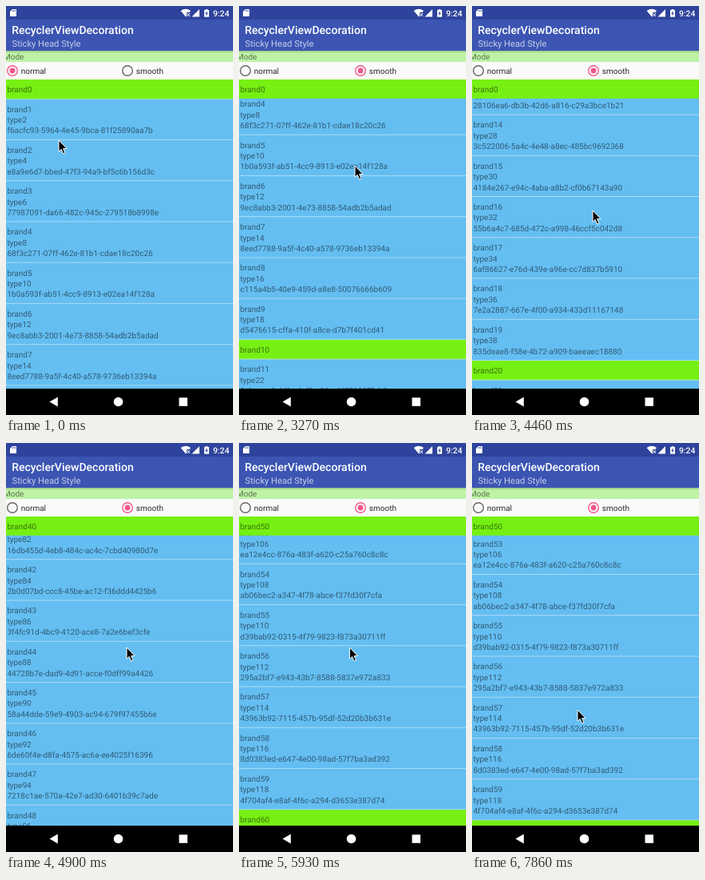
These frames come from a looping animation (284 px wide and 512 px high, 8 s). An HTML page with a canvas:

```html
<!DOCTYPE html>
<html lang="en">
<head>
<meta charset="utf-8">
<title>Sticky head list</title>
<style>
  html, body { margin: 0; width: 100%; height: 100%; overflow: hidden; background: #000; }
  canvas { display: block; width: 284px; height: 512px; }
</style>
</head>
<body>
<canvas id="stage"></canvas>
<script>
const W = 284, H = 512, LOOP = 8000, TICK = 148.3, LAST_TICK = 53;
const LIST_TOP = 92, LIST_BOTTOM = 479;
const HEAD_H = 24.6, ITEM_H = 51.25, GROUP_H = HEAD_H + 9 * ITEM_H;
const FONT = 'Roboto, "Noto Sans", sans-serif';
const GREEN = '#76f013', BLUE = '#64bef2', PINK = '#f2588a', GRAY = '#666';
const STATUS = '#2e439c', BAR = '#3c55b3', LINE = '#b4dcf4';
const SOFT = 'rgba(0,0,0,.52)';

const canvas = document.getElementById('stage');
const ctx = canvas.getContext('2d');
const ratio = window.devicePixelRatio || 1;
canvas.width = W * ratio;
canvas.height = H * ratio;
ctx.scale(ratio, ratio);
ctx.textRendering = 'geometricPrecision';

// Row labels of the resting screens; rows that only pass by get seeded ids.
const restingIds = {
  1: `f6acfc93-5964-4e45-9bca-81f25890aa7b e8a9e6d7-bbed-47f3-94a9-bf5c6b156d3c
      77987091-da66-482c-945c-279518b8998e 68f3c271-07ff-462e-81b1-cdae18c20c26
      1b0a593f-ab51-4cc9-8913-e02ea14f128a 9ec8abb3-2001-4e73-8858-54adb2b5adad
      8eed7788-9a5f-4c40-a578-9736eb13394a`,
  53: `ea12e4cc-876a-483f-a620-c25a760c8c8c ab06bec2-a347-4f78-abce-f37fd30f7cfa
      d39bab92-0315-4f79-9823-f873a30711ff 295a2bf7-e943-43b7-8588-5837e972a833
      43963b92-7115-457b-95df-52d20b3b631e 8d0383ed-e647-4e00-98ad-57f7ba3ad392
      4f704af4-e8af-4f6c-a294-d3653e387d74`
};
const ids = {};
for (const [first, run] of Object.entries(restingIds))
  run.split(/\s+/).forEach((id, i) => { ids[+first + i] = id; });

function idFor(n) {
  if (ids[n]) return ids[n];
  let seed = n * 7919 + 17;
  const hex = () => {
    seed = (Math.imul(seed, 1664525) + 1013904223) >>> 0;
    return (seed >>> 28).toString(16);
  };
  return ids[n] = 'xxxxxxxx-xxxx-4xxx-axxx-xxxxxxxxxxxx'.replace(/x/g, hex);
}

// Pointer moves in ticks; it rests between them.
const home = { x: 66, y: 168 };
const moves = [
  { from: 1, to: 4, x: 125, y: 355 },
  { from: 4, to: 6, x: 171, y: 190 },
  { from: 6, to: 8, x: 153, y: 74 },
  { from: 14, to: 18, x: 146, y: 371 },
  { from: 19, to: 22, x: 145, y: 200 },
  { from: 22, to: 27, x: 151, y: 467 },
  { from: 28, to: 30, x: 151, y: 256 },
  { from: 36, to: 42, x: 134, y: 256 },
  { from: 43, to: 46, x: 134, y: 291 },
  { from: 47, to: 53, x: 132, y: 334 }
];

// Each drag scrolls with the pointer past a slop, then may coast on.
const SLOP = 11;
const drags = [
  { press: 19, release: 22, coast: 261, decay: 1.5 },
  { press: 28, release: 30, coast: 1970, decay: 2.616 },
  { press: 43, release: 46, coast: 0, decay: 1 },
  { press: 47, release: 53, coast: 0, decay: 1 }
];

function pointerAt(k) {
  let { x, y } = home;
  for (const m of moves) {
    if (k <= m.from) break;
    const u = Math.min(1, (k - m.from) / (m.to - m.from));
    const e = u * u * (3 - 2 * u);
    x += (m.x - x) * e;
    y += (m.y - y) * e;
  }
  return { x, y };
}

function scrollAt(k) {
  let scroll = 0;
  for (const d of drags) {
    if (k <= d.press) break;
    const pull = pointerAt(d.press).y - pointerAt(Math.min(k, d.release)).y;
    scroll += Math.sign(pull) * Math.max(0, Math.abs(pull) - SLOP);
    if (k > d.release) scroll += d.coast * (1 - Math.exp((d.release - k) / d.decay));
  }
  return scroll;
}

function box(x, y, w, h, color) {
  ctx.fillStyle = color;
  ctx.fillRect(x, y, w, h);
}

function text(str, x, y, size, color, weight = 400) {
  ctx.font = `${weight} ${size}px ${FONT}`;
  ctx.fillStyle = color;
  ctx.fillText(str, x, y);
}

function poly(color, ...pts) {
  ctx.beginPath();
  for (let i = 0; i < pts.length; i += 2) ctx.lineTo(pts[i], pts[i + 1]);
  ctx.closePath();
  ctx.fillStyle = color;
  ctx.fill();
}

function disc(x, y, r, color) {
  ctx.beginPath();
  ctx.arc(x, y, r, 0, Math.PI * 2);
  ctx.fillStyle = color;
  ctx.fill();
}

function ring(x, y, r, width, color) {
  ctx.beginPath();
  ctx.arc(x, y, r, 0, Math.PI * 2);
  ctx.lineWidth = width;
  ctx.strokeStyle = color;
  ctx.stroke();
}

function drawStatus() {
  // Memory card
  poly('#fff', 8, 4, 13, 4, 13, 13, 5, 13, 5, 7);
  for (let i = 0; i < 3; i++) box(8 + i * 1.6, 5, .7, 2, STATUS);
  // Wi-Fi with a cross
  ctx.beginPath();
  ctx.moveTo(225, 13.5);
  ctx.lineTo(218.6, 6);
  ctx.quadraticCurveTo(225, 1.6, 231, 6);
  ctx.fillStyle = '#fff';
  ctx.fill();
  box(226, 8, 5, 6, STATUS);
  ctx.strokeStyle = '#fff';
  ctx.lineWidth = 1;
  ctx.beginPath();
  ctx.moveTo(226.5, 9); ctx.lineTo(230, 13);
  ctx.moveTo(230, 9); ctx.lineTo(226.5, 13);
  ctx.stroke();
  // Signal and battery
  poly('#fff', 242, 4, 242, 13.5, 232.5, 13.5);
  box(248, 5, 6, 8.7, '#fff');
  box(249.7, 4, 2.6, 1, '#fff');
  poly(STATUS, 251.6, 6, 249.2, 9.8, 250.7, 9.8, 250.4, 12.6, 252.8, 8.8, 251.3, 8.8);
  text('9:24', 259, 13, 10.3, '#fff', 500);
}

function drawBars() {
  box(0, 0, W, 17, STATUS);
  drawStatus();
  box(0, 17, W, 39, BAR);
  text('RecyclerViewDecoration', 7.2, 35, 14, '#fff', 500);
  text('Sticky Head Style', 7.5, 51, 11.2, 'rgba(255,255,255,.7)');

  box(0, 56, W, 14, '#bef3a6');
  const shade = ctx.createLinearGradient(0, 56, 0, 59);
  shade.addColorStop(0, 'rgba(0,0,0,.2)');
  shade.addColorStop(1, 'rgba(0,0,0,0)');
  box(0, 56, W, 3, shade);
  text('Mode', -3, 67, 10, SOFT);
  box(0, 70, W, 22, '#fafafa');
}

function drawRadio(x, label, on, changing) {
  const color = on ? PINK : GRAY;
  if (changing) ring(x, 81, 5.1, 3.6, color);
  else {
    ring(x, 81, 6.3, 1.4, color);
    if (on) disc(x, 81, 3.4, color);
  }
  text(label, x + 10.8, 84.6, 10, 'rgba(0,0,0,.84)');
}

function drawRow(n, y) {
  const head = n % 10 === 0;
  const h = head ? HEAD_H : ITEM_H;
  if (head) box(0, y, W, h, GREEN);
  text('brand' + n, 1.5, y + 16, 10, SOFT);
  if (!head) {
    text('type' + n * 2, 1.5, y + 29.4, 10, SOFT);
    text(idFor(n), 1.5, y + 42.8, 10, SOFT);
  }
  box(0, y + h - .9, W, .9, LINE);
  return y + h;
}

function drawList(scroll, stickyNo) {
  ctx.save();
  ctx.beginPath();
  ctx.rect(0, LIST_TOP, W, LIST_BOTTOM - LIST_TOP);
  ctx.clip();
  box(0, LIST_TOP, W, LIST_BOTTOM - LIST_TOP, BLUE);
  let n = Math.floor(scroll / GROUP_H) * 10;
  let y = LIST_TOP - scroll % GROUP_H;
  while (y < LIST_BOTTOM) y = drawRow(n++, y);
  box(0, LIST_TOP, W, HEAD_H - .8, GREEN);
  text('brand' + stickyNo, 1.5, LIST_TOP + 16, 10, SOFT);
  ctx.restore();
}

function drawNav() {
  box(0, LIST_BOTTOM, W, H - LIST_BOTTOM, '#000');
  poly('#fff', 54.5, 495.5, 64.8, 489.6, 64.8, 501.4);
  disc(140.5, 495.5, 5.8, '#fff');
  box(216.5, 490.3, 10.5, 10.5, '#fff');
}

function drawPointer({ x, y }) {
  ctx.save();
  ctx.translate(x, y);
  ctx.lineJoin = 'round';
  poly('#000', 0, 0, 0, 14.2, 3.2, 11.4, 5.6, 17, 8, 16, 5.6, 10.6, 10, 10.4);
  ctx.strokeStyle = '#fff';
  ctx.lineWidth = 1;
  ctx.stroke();
  ctx.restore();
}

function draw(time) {
  const k = Math.min(LAST_TICK, Math.floor((time % LOOP + 7) / TICK));
  const scroll = scrollAt(k);
  // The sticky head catches up only after the second flick is released.
  const sticky = k <= drags[1].release ? 0 : Math.floor(scroll / GROUP_H) * 10;
  const smooth = k >= 14, changing = k === 14;

  drawBars();
  drawRadio(8, 'normal', !smooth, changing);
  drawRadio(152, 'smooth', smooth, changing);
  drawList(scroll, sticky);
  drawNav();
  drawPointer(pointerAt(k));
}

const start = performance.now();
function loop() {
  draw(performance.now() - start);
  requestAnimationFrame(loop);
}
loop();
</script>
</body>
</html>
```
